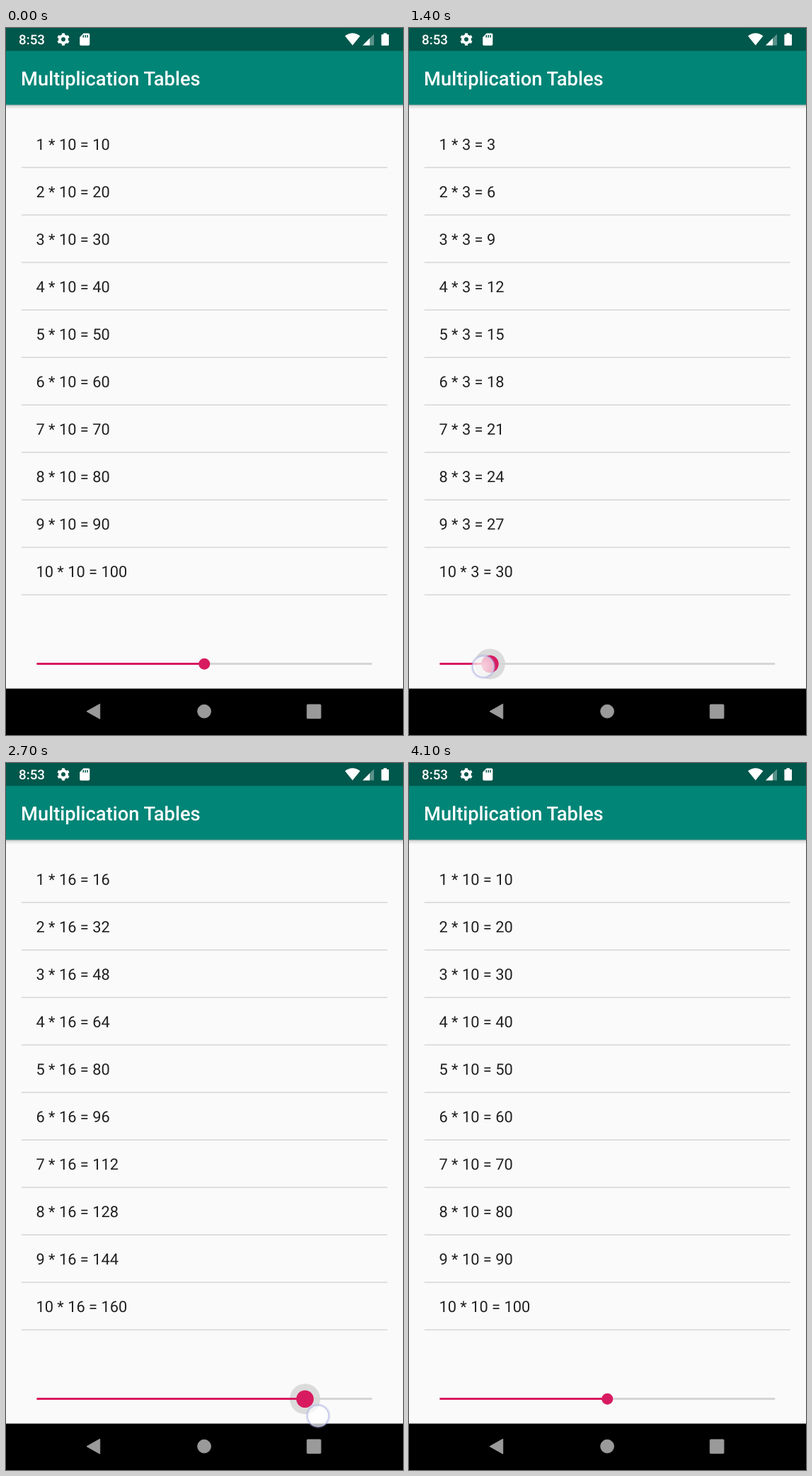
An HTML page for the animation above (5100 ms loop, 561 px wide and 998 px high).

```html
<!DOCTYPE html>
<html lang="en">
<head>
<meta charset="utf-8">
<title>Multiplication Tables</title>
<style>
  html, body { margin: 0; width: 100%; height: 100%; overflow: hidden; background: #fafafa; }
  svg { display: block; width: 100vw; height: 100vh; }
  text { font-family: Roboto, sans-serif; text-rendering: geometricPrecision; }
  .row { font-size: 21.84px; fill: #212121; }
  .bar { font-weight: 500; fill: #fff; }
</style>
</head>
<body>
<svg viewBox="0 0 561 998">
  <defs>
    <linearGradient id="shade" x2="0" y2="1">
      <stop offset="0" stop-color="#000" stop-opacity=".3"/>
      <stop offset=".35" stop-color="#000" stop-opacity=".11"/>
      <stop offset="1" stop-color="#000" stop-opacity="0"/>
    </linearGradient>
    <radialGradient id="glass">
      <stop offset="0" stop-color="#fff" stop-opacity=".8"/>
      <stop offset="1" stop-color="#fff" stop-opacity=".66"/>
    </radialGradient>
  </defs>

  <rect width="561" height="998" fill="#fafafa"/>
  <rect y="108" width="561" height="7" fill="url(#shade)"/>
  <rect y="32" width="561" height="76.4" fill="#008577"/>
  <rect width="561" height="32.3" fill="#00574b"/>
  <text class="bar" x="21.1" y="81" font-size="27.3">Multiplication Tables</text>

  <text class="bar" x="18" y="23" font-size="18.8">8:53</text>
  <g fill="none" stroke="#fff">
    <circle cx="81" cy="16" r="5" stroke-width="4"/>
    <circle cx="81" cy="16" r="7.3" stroke-width="3" pathLength="12" stroke-dasharray="1 1" stroke-dashoffset="1.5"/>
  </g>
  <path d="M109.5 7.5H116.5Q118.3 7.5 118.3 9.3V23Q118.3 24.8 116.5 24.8H106Q104.2 24.8 104.2 23V13Z" fill="#fff"/>
  <path d="M109.3 10v3.6M112.2 10v3.6M115.1 10v3.6" stroke="#00574b" stroke-width="1.5"/>
  <path d="M479 11.2Q489.7 3.2 500.4 11.2L489.7 24.6Z" fill="#fff"/>
  <path d="M504 24.5L520 8.5V24.5Z" fill="#fff" opacity=".35"/>
  <path d="M504 24.5L514 14.5V24.5Z" fill="#fff"/>
  <path d="M533.4 7.3H538V9H540Q541 9 541 10V23.8Q541 24.8 540 24.8H531.4Q530.4 24.8 530.4 23.8V10Q530.4 9 531.4 9H533.4Z" fill="#fff"/>

  <g id="list"></g>

  <rect y="932.5" width="561" height="65.5"/>
  <g fill="#9a9a9a" stroke="#9a9a9a" stroke-linejoin="round">
    <path d="M114 964.7L132.7 954.2V975.2Z"/>
    <circle cx="280.1" cy="964.6" r="9.4"/>
    <rect x="425.3" y="955" width="19.6" height="19.6" rx="1"/>
  </g>

  <circle id="halo" cy="897.7" fill="#000" fill-opacity=".125"/>
  <rect x="43.3" y="896" width="474" height="3" rx="1" fill="#d5d5d5"/>
  <rect id="fill" x="43.3" y="896" height="3" rx="1" fill="#d81b60"/>
  <circle id="thumb" cy="897.7" fill="#d81b60"/>
  <g id="touch">
    <circle r="16.5" fill="none" stroke="#a0a4e0" stroke-opacity=".28" stroke-width="2"/>
    <circle r="15" fill="url(#glass)" stroke="#c3c6e8" stroke-opacity=".9" stroke-width="1.7"/>
  </g>
</svg>
<script>
const NS = 'http://www.w3.org/2000/svg';
const LOOP = 5100, STEP = 100, PRESS = 600, RELEASE = 3700, LIFT = 3900;
const TRACK_X = 43.3, UNIT = 23.7, LAG = 70;
const $ = id => document.getElementById(id);
const clamp = (v, lo = 0, hi = 1) => Math.min(hi, Math.max(lo, v));

function set(el, attrs) {
  for (const key in attrs) el.setAttribute(key, attrs[key]);
  return el;
}

function add(parent, tag, attrs) {
  return parent.appendChild(set(document.createElementNS(NS, tag), attrs));
}

const rows = Array.from({ length: 10 }, (_, i) => {
  const y = i * 67.03;
  add($('list'), 'rect', { x: 21.8, y: 196.1 + y, width: 517, height: 1.6, fill: '#d9d9d9' });
  return add($('list'), 'text', { class: 'row', x: 42.4, y: 171.8 + y });
});

// Key points of the drag: time, x
const drag = [
  [600, 281], [950, 258], [1100, 194], [1400, 105], [1700, 39],
  [2000, 135], [2700, 441], [2850, 450], [3300, 342], [3700, 273]
];

// Speed at a key point, taken from its neighbours; zero at both ends
function slope(i) {
  const a = drag[i - 1], b = drag[i + 1];
  return a && b ? (b[1] - a[1]) / (b[0] - a[0]) : 0;
}

// Smooth curve through the key points
function fingerX(time) {
  const last = drag.length - 1;
  const t = clamp(time, drag[0][0], drag[last][0]);
  const i = Math.max(1, drag.findIndex(p => p[0] >= t));
  const [t0, x0] = drag[i - 1], [t1, x1] = drag[i];
  const d = t1 - t0, u = (t - t0) / d, v = 1 - u;
  return v * v * (1 + 2 * u) * x0 + u * u * (3 - 2 * u) * x1
    + u * v * d * (v * slope(i - 1) - u * slope(i));
}

// The finger sinks below the track during the drag
const fingerY = t => 895 + 28 * Math.sin(Math.PI / 2 * clamp((t - 1100) / 2000));

// The slider follows the finger with a short delay
const value = t => clamp(Math.round((fingerX(t - LAG) - TRACK_X) / UNIT), 1, 20);

function render(time) {
  const t = Math.floor((time % LOOP) / STEP) * STEP;
  const n = value(t);
  const x = TRACK_X + n * UNIT;
  const grow = clamp((t - PRESS) / 400);
  const shrink = clamp((t - LIFT + STEP) / 300);

  rows.forEach((row, i) => {
    const label = `${i + 1} * ${n} = ${(i + 1) * n}`;
    if (row.textContent !== label) row.textContent = label;
  });

  set($('fill'), { width: x - TRACK_X });
  set($('thumb'), { cx: x, r: 8 + 4.3 * (grow - shrink) });
  set($('halo'), { cx: x, r: t < RELEASE ? 21.5 * grow : 0 });
  set($('touch'), {
    visibility: t >= PRESS && t < LIFT ? 'visible' : 'hidden',
    transform: `translate(${fingerX(t)} ${fingerY(t)})`
  });
}

const start = performance.now();
function tick() {
  render(performance.now() - start);
  requestAnimationFrame(tick);
}
tick();
</script>
</body>
</html>
```
